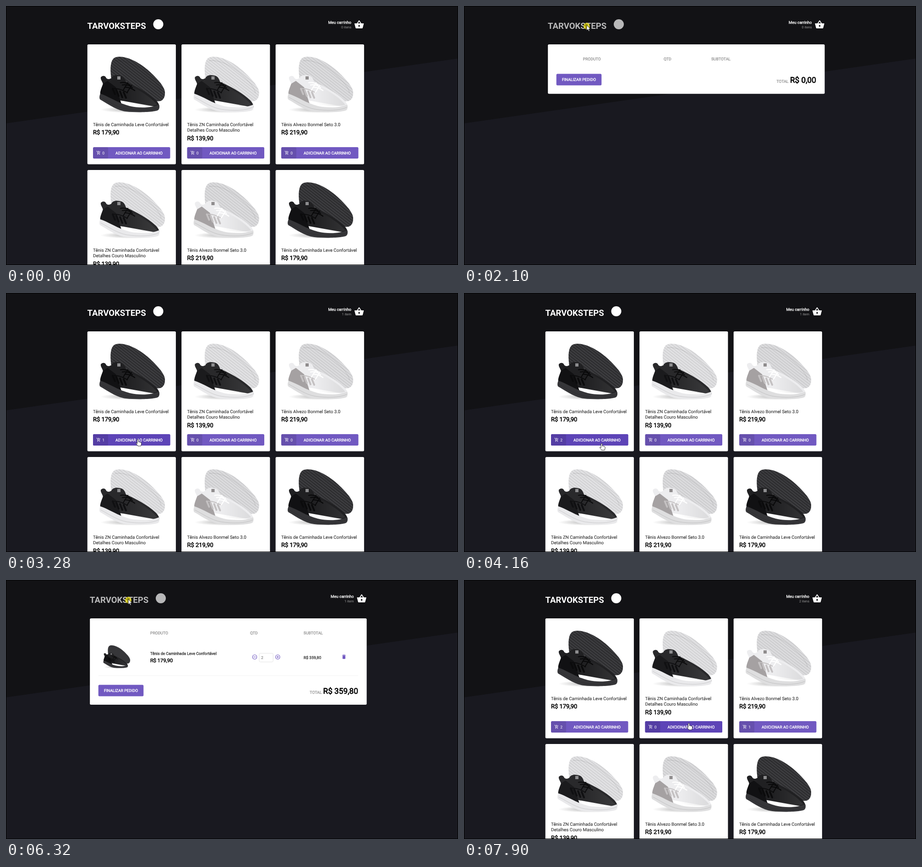
An HTML page for the animation above (8000 ms loop, 987 by 567 pixels).

```html
<!DOCTYPE html>
<html lang="pt-BR">
<head>
<meta charset="utf-8">
<title>Loja de tênis</title>
<style>
html, body { margin: 0; width: 100%; height: 100%; overflow: hidden; background: #191920; }
svg { display: block; }
text { font-family: Roboto, Arial, sans-serif; fill: currentColor; white-space: pre; text-rendering: geometricPrecision; }
.b { stroke: currentColor; stroke-width: .042em; }
</style>
</head>
<body>
<svg id="stage" width="987" height="567" viewBox="0 0 987 567"></svg>
<script>
const PURPLE = '#7159c1', DARK_PURPLE = '#5d44b7';
const SMALL = 8.63;
const PITCH = 205.5, ROW = 275;

const text = (x, y, size, str, color, attrs = '') =>
  `<text x="${x}" y="${y}" font-size="${size}" color="${color}" ${attrs}>${str}</text>`;
const bold = (x, y, size, str, color, attrs = '') => text(x, y, size, str, color, 'class="b" ' + attrs);
const rect = (x, y, w, h, fill, attrs = '') =>
  `<rect x="${x}" y="${y}" width="${w}" height="${h}" fill="${fill}" ${attrs}/>`;
const path = (d, fill, attrs = '') => `<path d="${d}" fill="${fill}" ${attrs}/>`;
const group = (x, y, scale, body, attrs = '') =>
  `<g transform="translate(${x} ${y}) scale(${scale})" ${attrs}>${body}</g>`;
const END = 'text-anchor="end"', MID = 'text-anchor="middle"', R = 'rx="2.5"';

const ICONS = {
  basket: 'M17.2 9l-4.4-6.56c-.4-.56-1.26-.56-1.66 0L6.8 9H2c-.55 0-1 .45-1 1l2.58 9.54c.23.84 1 1.46 1.92 1.46h13c.92 0 1.69-.62 1.93-1.46L23 10c0-.55-.45-1-1-1zM9 9l3-4.4L15 9zm3 8a2 2 0 1 1 0-4 2 2 0 0 1 0 4z',
  add: 'M11 9h2V6h3V4h-3V1h-2v3H8v2h3zM7 18a2 2 0 1 0 0 4 2 2 0 0 0 0-4zm10 0a2 2 0 1 0 0 4 2 2 0 0 0 0-4zm-9.8-3.3l.9-1.7h7.45c.75 0 1.41-.41 1.75-1.03l3.86-7.01L19.4 4l-3.85 7H8.53L4.27 2H1v2h2l3.6 7.59-1.35 2.45C4.5 15.4 5.5 17 7 17h12v-2H7.4z',
  trash: 'M6 19c0 1.1.9 2 2 2h8c1.1 0 2-.9 2-2V7H6zM19 4h-3.5l-1-1h-5l-1 1H5v2h14z'
};

// Shoe colours: back sole, hatch opacity, upper, heel, front sole, laces, cage, tag
const SHOES = {
  black: ['#3d3d40', .45, '#202022', '#111113', '#353538', '#09090a', '#0b0b0c', '#8c8c8e'],
  mixed: ['#e2e2e4', .11, '#29292b', '#1b1b1d', '#e9e9eb', '#0d0d0e', '#101012', '#8c8c8e'],
  white: ['#dcdcde', .11, '#ededef', '#a5a1a2', '#dededf', '#ffffff', '#c4c1c2', '#8f8c8d']
};

function shoe(kind) {
  const [back, hatch, upper, heel, sole, lace, cage, tag] = SHOES[kind];
  const outline = 'M230 160C226 132 229 115 240 112C262 107 292 124 312 142C328 157 345 174 347 188C348 203 340 211 328 208L240 170Z';
  const front = 'M207 156C210 152 216 152 218 156C220 161 225 161 230 158C232 152 240 150 248 152C256 153 259 157 262 166C285 176 310 190 325 204C333 211 335 216 335 222L206 199C205 190 212 180 212 172C211 165 206 162 207 156Z';
  const rim = 'M206 192C204 196 203 203 206 205C222 214 240 228 262 231C290 234 325 232 332 228C335 226 336 220 334 216C320 222 295 225 270 219C245 213 225 198 206 192Z';
  const line = (d, color, w) => path(d, 'none', `stroke="${color}" stroke-width="${w}" stroke-linecap="round"`);
  return '<ellipse cx="272" cy="227" rx="66" ry="7" fill="url(#shade)"/>'
    + path(outline, back)
    + path(outline, 'url(#hatch)', `opacity="${hatch}"`)
    + line('M238 120C262 116 292 134 310 151C325 165 337 178 339 190', '#0002', 1)
    + path(front, upper)
    + path('M268 174C290 183 315 198 330 216C310 222 284 219 264 212Z', 'url(#knit)')
    + path('M212 170C206 185 205 190 206 193C222 199 236 208 252 214L240 178L222 164Z', heel)
    + line('M233 181l5 12M241 184l5 13M249 187l5 13M257 189l5 12', cage, 4)
    + line('M234 181C244 180 255 184 265 190', cage, 2)
    + line('M250 168C258 166 266 169 271 174M254 173C262 171 270 174 276 179M259 178C267 177 274 180 281 185M266 168L256 184M274 174L264 190', lace, 2.2)
    + rect(243, 154, 7, 7, tag)
    + path(rim, sole)
    + line('M207 200C225 209 242 222 264 226C290 230 318 229 333 222', '#0002', 1);
}

const NAMES = {
  black: ['Tênis de Caminhada Leve Confortável'],
  mixed: ['Tênis ZN Caminhada Confortável', 'Detalhes Couro Masculino'],
  white: ['Tênis Alvezo Bonmel Seto 3.0']
};
const PRICES = { black: '179,90', mixed: '139,90', white: '219,90' };

function card(kind, i) {
  const lines = NAMES[kind];
  return group(i % 3 * PITCH, Math.floor(i / 3) * ROW, 1,
    rect(177.7, 84, 193.2, 262.5, '#fff', R)
    + shoe(kind)
    + lines.map((s, n) => text(190, 262.5 + n * 12.3, 9.86, s, '#333', 'class="b" style="stroke-width:.015em"')).join('')
    + bold(190, 268.9 + lines.length * 12.3, 12.95, 'R$ ' + PRICES[kind], '#000')
    + rect(190, 309, 168.5, 25, PURPLE, R)
    + rect(190, 309, 168.5, 25, DARK_PURPLE, `${R} id="hot${i}" opacity="0"`)
    + rect(190, 309, 33, 25, '#0000001a', R)
    + group(197.3, 316.5, .411, path(ICONS.add, '#fff'))
    + text(210.2, 324.6, SMALL, '0', '#fff', `id="count${i}"`)
    + bold(290.6, 324.6, SMALL, 'ADICIONAR AO CARRINHO', '#fff', MID));
}

function cart(id, columns, height, drop, total, totalX, row) {
  const heads = ['PRODUTO', 'QTD', 'SUBTOTAL'].map((s, n) => bold(columns[n], 119.2, SMALL, s, '#999')).join('');
  return `<g id="${id}">` + rect(183.2, 84, 604.4, height, '#fff', R) + heads + row
    + group(0, drop, 1,
      rect(201.7, 148.6, 98.6, 25.2, PURPLE, R)
      + bold(251, 164.3, SMALL, 'FINALIZAR PEDIDO', '#fff', MID)
      + bold(totalX, 168, SMALL, 'TOTAL', '#999', END)
      + bold(769, 168, 17.26, total, '#000', END)) + '</g>';
}

const ring = (x, sign) => `<g fill="none" stroke="${PURPLE}" stroke-width="1.1"><circle cx="${x}" cy="168.5" r="4.7"/><path d="${sign}"/></g>`;
const item = group(128.8, 97.5, .41, shoe('black'))
  + bold(315, 164, SMALL, NAMES.black[0], '#333')
  + bold(315, 180, 11.1, 'R$ 179,90', '#000')
  + ring(543, 'M540.4 168.5h5.2')
  + rect(552.9, 160.4, 30.4, 19, '#fff', R + ' stroke="#ddd" stroke-width=".8"')
  + text(557, 172.6, SMALL, '2', '#666')
  + ring(593.4, 'M590.8 168.5h5.2M593.4 165.9v5.2')
  + bold(650, 172.6, SMALL, 'R$ 359,80', '#333')
  + group(731.8, 162, .514, path(ICONS.trash, PURPLE))
  + rect(201.7, 209, 567.3, .7, '#eee');

const stage = document.getElementById('stage');
stage.innerHTML = `<defs>
  <pattern id="hatch" width="5" height="5" patternUnits="userSpaceOnUse" patternTransform="rotate(38)"><path d="M0 1q1.25 1 2.5 0t2.5 0" fill="none" stroke="#000" stroke-width="1.5"/></pattern>
  <linearGradient id="knit"><stop stop-color="#888" stop-opacity="0"/><stop offset="1" stop-color="#888" stop-opacity=".18"/></linearGradient>
  <radialGradient id="shade"><stop stop-color="#000" stop-opacity=".3"/><stop offset="1" stop-color="#000" stop-opacity="0"/></radialGradient>
  </defs>`
  + rect(0, 0, 987, 567, '#191920')
  + path('M0 0H987V115L0 257Z', '#121215')
  + '<g id="header"><g id="logo">'
  + text(177.5, 50, 18.6, 'TARVOKSTEPS', '#fff', 'font-weight="700"')
  + '<circle cx="332.5" cy="40" r="11" fill="#fff"/></g><g id="basket">'
  + bold(754, 38.5, SMALL, 'Meu carrinho', '#fff', END)
  + text(754, 48.5, 7.4, '', '#999', END + ' id="items"')
  + group(760, 29.6, .925, path(ICONS.basket, '#fff')) + '</g></g>'
  + '<g id="home">' + ['black', 'mixed', 'white', 'mixed', 'white', 'black'].map(card).join('') + '</g>'
  + cart('empty', [259.8, 436, 540], 108.2, 0, 'R$ 0,00', 708.5, '')
  + cart('full', [315, 533, 649.8], 189, 80.8, 'R$ 359,80', 689.3, item)
  + '<circle id="press" r="7.2" fill="#fff000" fill-opacity=".62"/>'
  + '<g id="pointer" fill="#fff" stroke="#111" stroke-width=".8" stroke-linejoin="round">'
  + '<path id="arrow" d="M0 0V11.5L2.6 9.1L4.4 13.2L6.3 12.4L4.5 8.4H8Z"/>'
  + '<path id="hand" d="M-1.4 .8C-1.4 -.6 1.4 -.6 1.4 .8V5.2C2 4.4 3.6 4.6 3.7 5.6C4.5 5 5.8 5.3 5.8 6.3C6.6 5.8 7.6 6.2 7.6 7.2V10C7.6 11.5 6.6 12.4 6.4 14H-.2C-.6 12.2 -3 10.3 -4 8.4C-4.3 7.2 -2.8 6.9 -1.4 8.8Z"/></g>'
  + '<rect x=".5" y=".5" width="986" height="566" fill="none" stroke="#000"/>';

const $ = id => document.getElementById(id);
const show = (id, on) => $(id).setAttribute('display', on ? 'inline' : 'none');

// Pointer stops: time, x, y
const STOPS = [
  [-60, 566, 590], [780, 717, 40], [1290, 717, 40], [1650, 480, 54], [2030, 268, 42], [2270, 268, 42],
  [2430, 268, 193], [2600, 274, 312], [2850, 288, 321], [3450, 288, 321], [3800, 291, 323], [4080, 297, 328],
  [4160, 300, 330], [4210, 358, 330], [4640, 742, 39], [5020, 742, 39], [5280, 640, 165], [5480, 540, 198],
  [5820, 352, 130], [6180, 267, 42], [6400, 267, 42], [6660, 498, 235], [7020, 688, 322], [7490, 688, 322],
  [7590, 684, 344], [7690, 555, 346], [7770, 515, 330], [7880, 491, 314]
];
const same = (a, b) => a[1] === b[1] && a[2] === b[2];

function slope(i, axis) {
  const a = STOPS[i - 1], b = STOPS[i], c = STOPS[i + 1];
  return !a || !c || same(a, b) || same(b, c) ? 0 : (c[axis] - a[axis]) / (c[0] - a[0]);
}

function pointerAt(t) {
  const last = STOPS.length - 1;
  if (t <= STOPS[0][0]) return STOPS[0].slice(1);
  if (t >= STOPS[last][0]) return STOPS[last].slice(1);
  const i = STOPS.findIndex(s => s[0] > t) - 1;
  const a = STOPS[i], b = STOPS[i + 1], d = b[0] - a[0], u = (t - a[0]) / d;
  const s = u * u * (3 - 2 * u);
  return [1, 2].map(k => a[k] + (b[k] - a[k]) * s
    + d * u * (1 - u) * ((1 - u) * slope(i, k) - u * slope(i + 1, k)));
}

const PRESSES = [[840, 1120], [2100, 2310], [3060, 3240], [3440, 3620], [4690, 4860], [6240, 6430], [7160, 7350]];
const pageAt = t => t >= 980 && t < 2230 ? 'empty' : t >= 4800 && t < 6380 ? 'full' : 'home';

function linkAt(t) {
  const [x, y] = pointerAt(t), home = pageAt(t) === 'home', left = x - (home ? 0 : 5.5);
  if (y > 28 && y < 52) return left > 177 && left < 349 ? 'logo' : left > 703 && left < 783 ? 'basket' : '';
  const col = Math.floor((x - 190) / PITCH);
  return home && y > 309 && y < 334 && col >= 0 && col < 3 && x - 190 - col * PITCH < 168.5 ? 'hot' + col : '';
}

// Fades follow the share of the last 120 ms spent on the link
function hover(id, t) {
  let n = 0;
  for (let k = 0; k < 8; k++) n += linkAt(t - k * 15) === id;
  return n / 8;
}

function draw(t) {
  const page = pageAt(t), [x, y] = pointerAt(t), link = linkAt(t);
  for (const id of ['home', 'empty', 'full']) show(id, id === page);
  $('header').setAttribute('transform', `translate(${page === 'home' ? 0 : 5.5} 0)`);
  for (const id of ['logo', 'basket']) $(id).setAttribute('opacity', 1 - .3 * hover(id, t));
  for (let i = 0; i < 3; i++) $('hot' + i).setAttribute('opacity', hover('hot' + i, t));
  $('count0').textContent = (t >= 3150) + (t >= 3550);
  $('count2').textContent = +(t >= 7270);
  $('items').textContent = t < 3150 ? '0 itens' : t < 7270 ? '1 item' : '2 itens';
  const hand = link && link !== 'logo';
  show('hand', hand);
  show('arrow', !hand);
  $('pointer').setAttribute('transform', `translate(${x} ${y})`);
  show('press', PRESSES.some(([a, b]) => t >= a && t < b));
  $('press').setAttribute('cx', x);
  $('press').setAttribute('cy', y + 2);
}

const start = performance.now();
function tick(now) {
  draw(Math.max(0, now - start) % 8000);
  requestAnimationFrame(tick);
}
draw(0);
requestAnimationFrame(tick);
</script>
</body>
</html>
```
